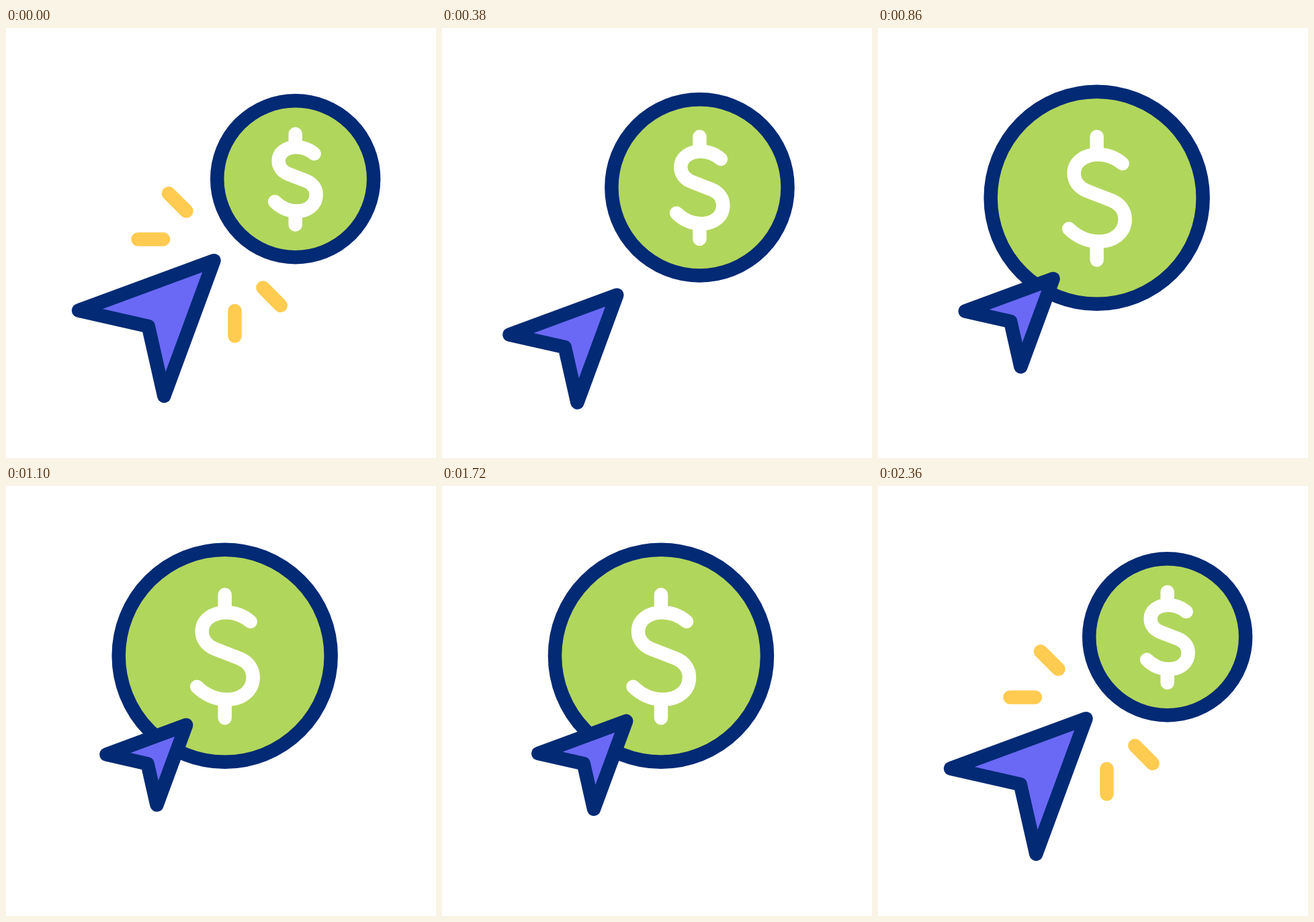
Write an HTML page with a canvas that moves like this. It is 640x640 px and loops after 2.4 s.

```html
<!DOCTYPE html>
<html lang="en">
<head>
<meta charset="utf-8">
<title>Click to pay</title>
<style>
  html, body { margin: 0; width: 100%; height: 100%; overflow: hidden; background: #fff; }
  canvas { display: block; width: 640px; height: 640px; }
</style>
</head>
<body>
<canvas id="stage" width="640" height="640"></canvas>
<script>
const ctx = document.getElementById('stage').getContext('2d');
const LOOP = 2400;
const LINE = 20.5;
const COIN_RADIUS = 158;
const NAVY = '#022a75', GREEN = '#b1d65c', PURPLE = '#6a69f5', YELLOW = '#ffcb50';

const DOLLAR = new Path2D(
  'M0 -91V-66 M0 66V92.5' +
  'M38 -51C28 -59.5 16 -64.5 2 -64.5C-19 -64.5 -34 -53 -34 -36.5' +
  'C-34 -25 -27 -15 -14 -10L22 4C35 9.5 42 19.5 42 32' +
  'C42 52 25 65 3 65C-14 65 -30 57.5 -41.5 46');

// Smooth step from 0 to 1 between two times.
function ramp(t, from, to) {
  const x = Math.min(1, Math.max(0, (t - from) / (to - from)));
  return x * x * (3 - 2 * x);
}

// Rises to 1, stays, then falls back to 0.
const pulse = (t, rise, top, fall, end) => ramp(t, rise, top) - ramp(t, fall, end);

function stroke(color, width, path) {
  ctx.strokeStyle = color;
  ctx.lineWidth = width;
  if (path) ctx.stroke(path);
  else ctx.stroke();
}

function fillOutlined(color) {
  ctx.fillStyle = color;
  ctx.fill();
  stroke(NAVY, LINE);
}

function drawCoin(t) {
  const move = pulse(t, 100, 700, 1700, 2360);
  const grow = pulse(t, 100, 800, 1800, 2360);
  const press = pulse(t, 1200, 1300, 1300, 1400);
  const scale = 0.737 + 0.263 * grow - 0.065 * press;

  ctx.save();
  ctx.translate(430.7 - 105 * move, 224.7 + 28.1 * move);
  ctx.beginPath();
  ctx.arc(0, 0, COIN_RADIUS * scale, 0, Math.PI * 2);
  fillOutlined(GREEN);
  ctx.scale(scale, scale);
  stroke('#fff', LINE / scale, DOLLAR);
  ctx.restore();
}

function drawSparks(t) {
  const scale = 1 - pulse(t, 100, 380, 2000, 2360);
  if (scale <= 0) return;
  const originX = 296, originY = 345, mirror = 655;

  // Each spark has a twin reflected across the arrow's axis.
  const addPair = (x0, y0, x1, y1) => {
    ctx.moveTo(x0, y0);
    ctx.lineTo(x1, y1);
    ctx.moveTo(mirror - y0, mirror - x0);
    ctx.lineTo(mirror - y1, mirror - x1);
  };

  ctx.save();
  ctx.translate(originX, originY);
  ctx.scale(scale, scale);
  ctx.translate(-originX, -originY);
  ctx.beginPath();
  addPair(196.5, 314.5, 234, 314.5);
  addPair(242, 246.3, 268.5, 272.6);
  stroke(YELLOW, LINE);
  ctx.restore();
}

function drawArrow(t) {
  const retreat = pulse(t, 100, 600, 600, 1000);
  const approach = pulse(t, 600, 1000, 1700, 2360);
  const shrink = pulse(t, 100, 600, 1800, 2360);
  const click = pulse(t, 1000, 1100, 1100, 1200);
  const scale = 1 - 0.35 * shrink - 0.06 * click;
  const half = 100.75 * scale, wing = 26.5 * scale, notch = 3 * scale;

  ctx.save();
  ctx.translate(208.8 - 48.2 * retreat, 446.9 + 51.75 * retreat - 31.75 * approach);
  ctx.beginPath();
  ctx.moveTo(half, -half);
  ctx.lineTo(-half, -wing);
  ctx.lineTo(notch, -notch);
  ctx.lineTo(wing, half);
  ctx.closePath();
  fillOutlined(PURPLE);
  ctx.restore();
}

function render(elapsed) {
  const t = elapsed % LOOP;
  ctx.fillStyle = '#fff';
  ctx.fillRect(0, 0, 640, 640);
  ctx.lineCap = ctx.lineJoin = 'round';
  drawCoin(t);
  drawSparks(t);
  drawArrow(t);
}

let start = null;
function tick(now) {
  if (start === null) start = now;
  render(now - start);
  requestAnimationFrame(tick);
}
render(0);
requestAnimationFrame(tick);
</script>
</body>
</html>
```
